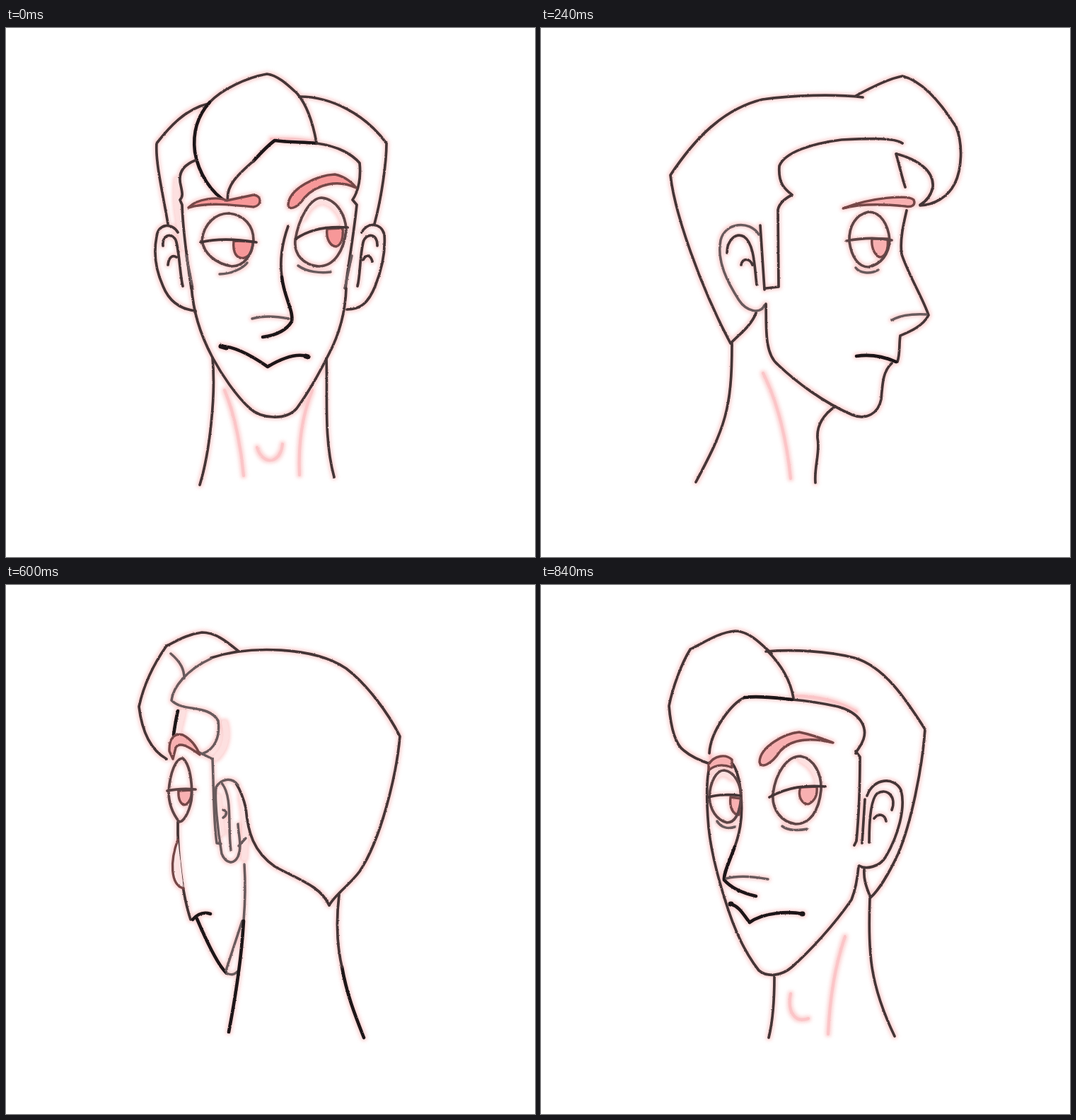
Animation of 748 by 748 pixels, one loop 960 ms. Source, as an HTML page:

```html
<!DOCTYPE html>
<html lang="en">
<head>
<meta charset="utf-8">
<title>Head turn</title>
<style>
  html, body { margin: 0; width: 100%; height: 100%; overflow: hidden; background: #fff; }
  svg { display: block; width: 100vw; height: 100vh; }
  path { fill: none; stroke: #443536; stroke-width: 3.7; stroke-linecap: round; stroke-linejoin: round; }
  .bold { stroke: #1d1618; stroke-width: 4.6; }
  .soft { stroke: #685a5c; stroke-width: 3.5; }
  .eye { stroke: #5d4546; stroke-width: 3.7; }
  .pink { stroke: #fbc5c8; stroke-width: 4; }
  .wash { stroke: #fde0e0; stroke-width: 8; }
  .tint { fill: #f8b0b1; stroke: #744747; stroke-width: 3.4; }
  .warm .tint { fill: #f79899; }
  .pose { visibility: hidden; animation: show 960ms step-end infinite; animation-delay: calc(var(--i) * 120ms - 960ms); }
  @keyframes show {
    0% { visibility: visible; }
    12.5%, 100% { visibility: hidden; }
  }
</style>
</head>
<body>
<svg viewBox="0 0 748 748">
  <defs>
    <filter id="pencil" filterUnits="userSpaceOnUse" x="0" y="0" width="748" height="748" color-interpolation-filters="sRGB">
      <feTurbulence type="fractalNoise" baseFrequency=".45" numOctaves="2" seed="4" result="grain"/>
      <feDisplacementMap in="SourceGraphic" in2="grain" scale="2" xChannelSelector="R" yChannelSelector="G" result="line"/>
      <feMorphology in="SourceAlpha" operator="dilate" radius="1.5"/>
      <feGaussianBlur stdDeviation="2.6" result="blur"/>
      <feFlood flood-color="#f58e90" flood-opacity=".42"/>
      <feComposite in2="blur" operator="in" result="halo"/>
      <feMerge><feMergeNode in="halo"/><feMergeNode in="line"/></feMerge>
    </filter>

    <!-- three-quarter view, facing right -->
    <g id="quarter">
      <path d="M427 94C390 91 340 93 302 103C260 115 230 160 202 204C206 260 222 338 240 380C253 408 268 432 279 442C286 425 289 415 288 402"/>
      <path d="M419 97C435 82 450 66 470 65C495 67 515 82 534 91C546 110 559 145 564 171C562 195 557 224 543 234C530 245 515 250 506 253"/>
      <path d="M300 235L294 243C294 280 295 320 299 362L302 368"/>
      <path d="M296 398C298 420 302 435 306 445C330 480 365 518 390 540C405 553 425 555 437 545C455 522 470 490 480 460C495 415 507 370 509 330C511 300 511 270 506 255"/>
      <path d="M284 298C275 272 245 271 236 290C229 315 240 355 258 385C266 398 285 403 295 397"/>
      <path d="M249 318C242 300 255 286 270 295C280 305 281 345 281 364M257 334C259 324 268 322 274 330M287 303L291 365"/>
      <path d="M280 443C283 520 280 565 245 638M415 553C415 590 418 620 423 640"/>
      <path d="M483 244C470 252 465 270 463 290C458 330 465 357 475 380"/>
      <path class="bold" d="M471 370C479 392 487 408 486 417C475 430 458 436 441 440"/>
      <path class="soft" d="M424 416C445 412 465 410 483 415"/>
      <path class="pink" d="M315 497C330 540 337 590 339 635M392 578C397 602 387 620 367 613"/>
    </g>

    <!-- seen from behind, facing right -->
    <g id="rear">
      <path class="wash" d="M436 195C430 215 436 232 448 244M412 300C406 330 406 360 408 385M445 300L440 350M495 180L506 225"/>
      <path d="M455 103C400 85 310 87 264 118C235 140 205 180 188 214C193 270 215 360 245 405C260 425 280 438 288 453C300 425 335 415 365 398C395 377 403 350 406 315C410 298 415 288 420 280"/>
      <path d="M417 93C435 78 450 67 468 67C490 70 505 80 518 86C535 110 550 140 557 172C553 205 541 233 518 246"/>
      <path class="soft" d="M453 246C451 290 452 330 447 365L441 366"/>
      <path class="soft" d="M417 283C426 271 441 274 448 286C450 302 446 345 440 380C434 394 423 396 417 384C411 370 416 355 417 338M440 280C424 300 432 340 427 375M438 318C431 320 433 326 438 329M406 358L416 369"/>
      <path d="M502 335C503 380 495 440 484 473"/>
      <path class="tint" style="fill:#fde3e3" d="M502 360C513 390 513 424 494 429"/>
      <path class="bold" d="M475 472C463 500 446 537 433 549"/>
      <path class="soft" d="M433 549C424 553 420 549 417 546M411 475C419 500 427 524 434 545"/>
      <path class="soft" d="M408 395C406 425 407 450 409 475"/>
      <path class="bold" d="M409 475C412 530 422 590 430 632M270 540C263 580 250 612 239 640"/>
      <path d="M274 438C279 480 277 510 270 540"/>
    </g>

    <!-- profile, facing left -->
    <g id="profile">
      <path d="M290 98C330 93 390 95 432 101C490 115 530 160 562 208C556 262 520 365 477 446C468 436 448 422 441 403"/>
      <path d="M300 96C280 85 255 72 234 68C205 75 180 105 158 140C148 165 150 200 160 220C170 240 190 250 209 251M242 178C212 186 189 202 191 225C194 239 202 246 209 250"/>
      <path d="M234 163C245 155 280 156 320 158C360 163 400 175 408 195C410 220 400 228 390 236C398 240 408 247 410 257L409 366L427 368M435 279L429 370"/>
      <path class="soft" d="M437 292C450 271 485 275 491 300C497 330 481 360 465 385C455 400 435 406 429 392"/>
      <path d="M482 318C482 300 470 289 458 295C443 305 443 340 440 363M462 335C460 325 450 325 446 335"/>
      <path d="M243 178C238 195 235 210 230 225M228 258C232 275 238 300 235 320C225 350 205 382 197 406C205 422 225 430 237 435C239 448 237 460 241 472"/>
      <path class="bold" d="M243 472C262 464 280 461 299 464"/>
      <path d="M249 474C261 485 262 500 264 525C268 545 285 555 305 547C345 530 385 500 410 476C430 460 426 420 427 390"/>
      <path class="soft" d="M200 405C220 404 237 406 249 413"/>
      <path d="M329 535C350 550 355 565 354 580C350 600 359 620 357 643M475 446C475 540 485 565 526 642"/>
      <path class="pink" d="M431 488C410 530 398 580 392 637"/>
    </g>
  </defs>

  <g filter="url(#pencil)">
    <!-- front -->
    <g class="pose warm" style="--i:0">
      <path class="wash" d="M242 215C238 245 245 275 251 310M420 268C428 250 440 244 450 245C465 250 474 262 477 276"/>
      <path class="pink" d="M375 157C400 156 420 158 438 161"/>
      <path d="M286 107C253 115 231 140 213 163C211 190 222 235 229 277M415 97C460 97 508 122 538 163C538 190 531 240 521 277"/>
      <path d="M439 162C435 140 428 112 412 93C400 82 385 67 369 65C340 70 305 87 288 105"/>
      <path class="bold" d="M288 105C270 125 264 150 267 175C272 205 290 234 314 247M350 188C360 177 370 166 380 159C400 162 420 161 439 163"/>
      <path d="M314 247C309 222 332 204 350 188M439 163C470 167 490 179 500 191C502 210 499 230 490 243L496 250C492 290 484 335 480 368"/>
      <path d="M268 187C250 194 243 206 247 222C249 232 251 238 246 243L249 250C250 290 258 340 262 368"/>
      <path class="soft" d="M255 322L264 368M489 322L479 368"/>
      <path d="M243 289C235 275 215 276 213 295C208 320 213 345 222 365C232 390 250 398 268 400M503 289C511 274 530 275 535 292C537 320 530 345 522 365C512 390 500 398 482 398"/>
      <path d="M222 308C220 290 238 289 241 303C246 325 246 350 250 365M229 335C230 325 235 320 241 324M525 308C526 290 509 289 505 303C500 325 501 350 497 365M518 330C515 320 509 320 505 328"/>
      <path d="M262 365C265 400 273 430 292 466C305 490 325 520 345 538C360 552 395 556 411 538C430 512 445 484 456 462C473 430 480 400 481 368"/>
      <path d="M292 466C297 520 288 600 274 646M453 468C455 520 449 580 464 635"/>
      <path class="tint" d="M258 254C270 241 300 238 312 244L350 236C362 237 362 251 350 253C320 250 285 246 258 254ZM399 250C400 227 440 208 465 207C480 210 491 220 495 226C470 214 440 220 422 240C411 256 399 258 399 250Z"/>
      <path class="tint" d="M322 301C320 320 328 327 337 325C347 322 349 310 349 302ZM454 284C452 300 460 309 467 309C475 306 477 295 476 283Z"/>
      <path class="eye" d="M277 300C280 275 298 262 315 262C337 264 350 280 350 300C348 322 336 337 319 337C297 333 280 320 277 300ZM409 300C414 268 430 241 446 240C468 242 480 265 481 285C478 315 464 337 442 337C420 335 407 320 409 300Z"/>
      <path d="M275 303C300 297 330 299 354 303M410 298C430 284 455 280 483 282"/>
      <path class="soft" d="M302 348C318 348 335 340 341 332M413 336C425 345 445 347 459 345M348 411C365 406 385 408 400 411"/>
      <path d="M399 280C390 305 387 330 390 352"/>
      <path class="bold" d="M390 352C393 380 407 400 404 415C395 430 378 435 363 437M304 450C325 450 350 465 370 479C385 470 410 458 428 465"/>
      <path class="bold" style="stroke-width:7" d="M304 450L311 452M424 464L427 465"/>
      <path class="pink" d="M309 512C325 550 333 600 336 633M433 512C418 550 413 590 415 632M355 593C362 618 388 618 391 588"/>
    </g>

    <g class="pose" style="--i:1">
      <use href="#quarter"/>
      <path d="M431 152C445 170 475 168 487 180C500 195 506 212 508 228C506 238 503 245 497 250M440 161C400 163 350 167 325 173C300 180 283 195 287 215C290 225 295 232 300 235"/>
      <path class="tint" d="M328 255C345 242 390 239 428 236C437 240 436 250 428 252C395 247 360 248 328 255ZM474 248C476 232 490 220 500 218C506 222 506 235 504 246C495 237 482 240 474 248Z"/>
      <path class="tint" d="M396 297C390 315 397 325 404 325C413 318 413 305 412 299ZM490 290C483 305 490 314 495 315C501 308 503 295 502 284Z"/>
      <path class="eye" d="M348 300C350 275 365 259 382 259C402 262 415 280 415 300C412 325 400 341 384 341C362 335 349 320 348 300ZM464 300C465 265 476 243 488 243C502 246 507 268 505 290C502 320 494 337 482 337C470 335 464 320 464 300Z"/>
      <path d="M346 301C370 293 400 296 420 299M466 300C475 287 500 280 515 279"/>
      <path class="soft" d="M363 343C378 350 395 345 403 336M470 341C480 346 492 343 496 334"/>
      <path class="bold" d="M352 450C385 452 425 465 445 477C452 465 460 462 466 466"/>
      <path class="bold" style="stroke-width:8" d="M352 450h1M465 466h1"/>
    </g>

    <g class="pose" style="--i:2" transform="matrix(-1 0 0 1 745 0)">
      <use href="#profile"/>
      <path class="tint" d="M218 243C226 235 280 240 318 255C290 247 250 250 230 252C220 254 215 250 218 243Z"/>
      <path class="tint" d="M255 298C253 314 259 324 266 324C275 320 278 308 277 298Z"/>
      <path class="eye" d="M252 300C254 276 266 260 282 260C300 264 310 280 309 302C306 324 296 338 282 338C264 334 253 320 252 300ZM249 300C270 296 292 297 313 301"/>
      <path class="soft" d="M268 342C280 349 295 346 300 339"/>
    </g>

    <g class="pose" style="--i:3">
      <use href="#rear"/>
      <path class="soft" d="M510 160C500 180 460 165 445 190C438 210 447 230 465 240L453 246"/>
      <path d="M510 160C505 168 500 173 488 173M500 173C504 195 508 215 511 235"/>
      <path class="tint" d="M481 253C485 240 505 235 517 237C520 247 510 248 481 253ZM503 294C500 310 505 318 510 316L514 293Z"/>
      <path class="eye" d="M483 300C483 280 490 262 503 261C514 265 517 285 514 300C512 320 505 333 498 331C488 325 484 315 483 300ZM480 300C490 294 505 291 516 292"/>
      <path class="bold" d="M455 452C470 454 478 462 481 472"/>
    </g>

    <!-- back -->
    <g class="pose" style="--i:4">
      <path d="M229 277C220 240 207 190 208 163C240 120 285 92 372 91C460 92 505 120 537 163C538 190 525 240 517 277"/>
      <path d="M308 100C330 82 355 67 377 65C405 70 435 86 455 104"/>
      <path d="M229 277C233 330 245 375 268 400C300 422 345 425 372 452C400 425 445 422 477 400C500 375 512 330 517 277"/>
      <path class="soft" d="M228 279C215 276 208 290 210 310C213 350 228 388 258 395M518 279C531 276 538 290 536 310C533 350 518 388 488 395"/>
      <path d="M292 415C297 520 288 600 280 640M453 415C448 520 457 600 466 640"/>
    </g>

    <g class="pose" style="--i:5">
      <use href="#rear" transform="matrix(-1 0 0 1 745 0)"/>
      <path class="soft" d="M233 97C248 110 252 120 252 132M290 104C255 120 236 145 234 163C250 180 286 168 300 192C303 215 295 232 279 238M270 235L292 246"/>
      <path class="bold" d="M243 178C240 190 238 205 237 212"/>
      <path class="tint" d="M231 235C230 215 240 209 250 212C262 218 270 230 274 240C258 228 245 221 240 230L236 246ZM244 291C243 305 249 313 255 310C261 305 263 297 262 290Z"/>
      <path class="eye" d="M230 292C232 265 240 245 250 245C262 255 264 290 262 305C258 325 250 335 245 335C237 325 230 310 230 292ZM228 291C242 288 255 288 268 289"/>
      <path class="bold" d="M264 473C272 464 280 462 289 465"/>
    </g>

    <g class="pose" style="--i:6">
      <use href="#profile"/>
      <path d="M237 86C262 105 274 130 273 155"/>
      <path class="tint" d="M218 246C217 236 228 232 238 232C250 220 265 205 277 206C295 212 310 220 322 226C300 219 280 213 265 218C250 228 238 242 230 254C222 257 218 252 218 246Z"/>
      <path class="tint" d="M281 290C282 305 288 312 295 312C305 308 308 298 307 288Z"/>
      <path class="eye" d="M251 298C254 268 268 244 283 243C300 246 309 268 309 290C307 318 299 336 285 336C265 332 250 320 251 298ZM249 300C270 289 290 286 312 287"/>
      <path class="soft" d="M268 338C280 348 295 347 299 340"/>
    </g>

    <g class="pose" style="--i:7">
      <path class="wash" d="M368 247C382 254 390 266 392 281M243 275C250 264 262 264 270 272"/>
      <path class="pink" d="M360 157C390 157 420 164 446 179M238 232L240 248"/>
      <use href="#quarter" transform="matrix(-1 0 0 1 745 0)"/>
      <path d="M357 160C352 130 335 108 320 93M238 238C240 205 270 167 288 159M355 162C380 164 402 168 420 172C450 180 462 200 456 218C452 230 447 232 445 238"/>
      <path class="bold" d="M288 159C310 156 335 160 355 162"/>
      <path class="tint" d="M309 250C310 228 345 210 365 208C385 212 400 218 413 223C385 216 355 216 338 235C325 255 310 260 309 250ZM237 254C245 240 262 239 270 247L270 258C255 252 245 255 237 262Z"/>
      <path class="tint" d="M367 286C362 300 370 310 378 310C388 305 391 295 390 285ZM268 300C266 315 272 325 280 325L283 302Z"/>
      <path class="eye" d="M328 295C332 265 348 242 367 242C387 246 397 268 396 290C393 320 380 338 360 338C340 335 326 318 328 295ZM238 300C239 278 248 262 259 262C274 264 283 282 283 300C281 322 275 336 263 336C248 332 239 318 238 300Z"/>
      <path d="M323 300C350 285 375 283 402 285M237 300C250 296 270 296 282 298"/>
      <path class="soft" d="M341 341C350 348 366 347 376 345M249 334C255 344 266 345 274 342"/>
      <path class="bold" d="M268 451C282 455 287 468 295 477C315 463 350 461 370 465"/>
      <path class="bold" style="stroke-width:7" d="M268 451h1M369 465h1"/>
    </g>
  </g>
</svg>
</body>
</html>
```
